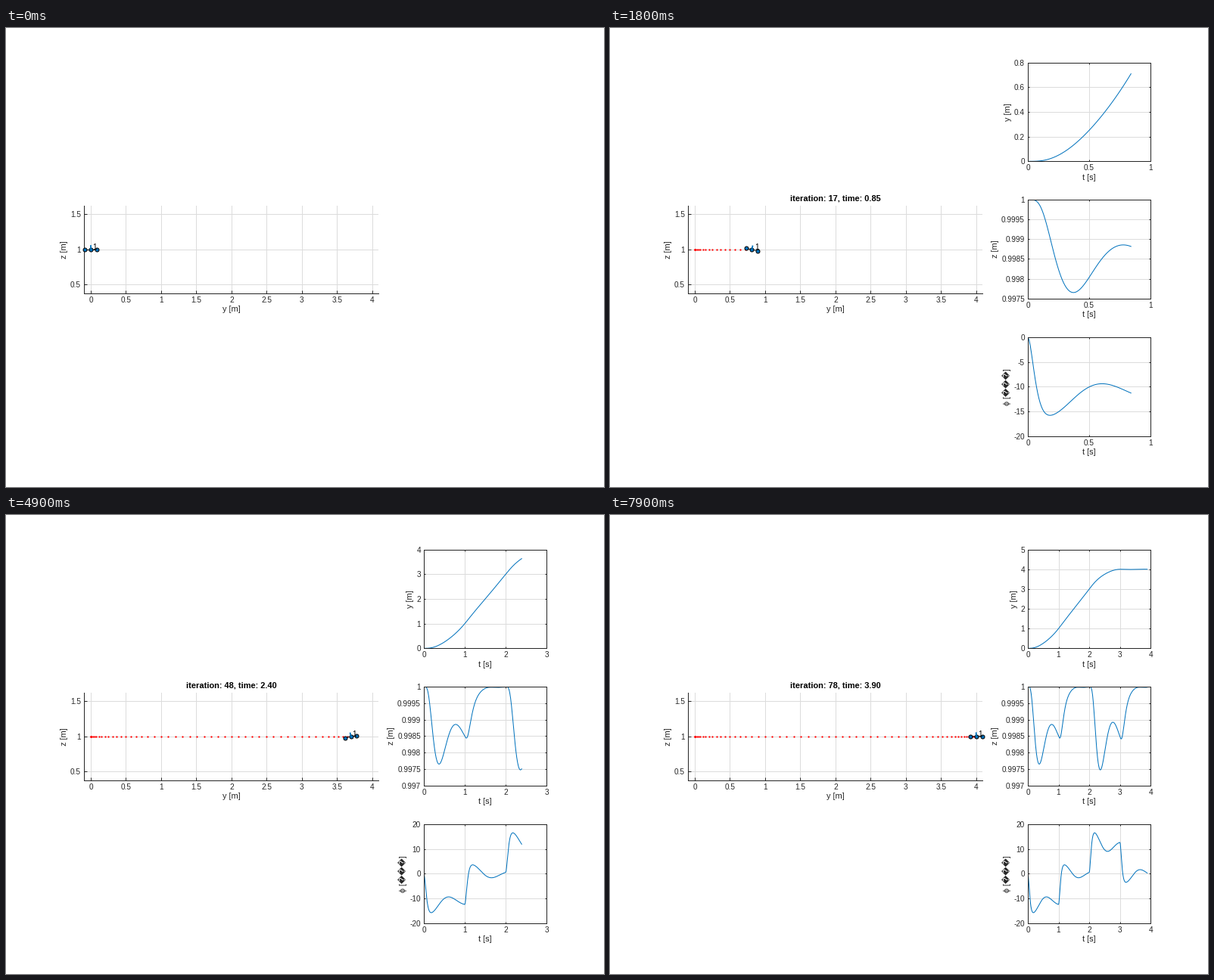
A matplotlib script for the animation above (8 s loop, 790 px wide and 607 px high).

```python
import math

import matplotlib.pyplot as plt
import numpy as np
from matplotlib.animation import FuncAnimation

W, H, DPI = 790, 607, 100
PX = 72 / DPI                      # one pixel in points
DARK, BLUE, GRID = "#262626", "#0072bd", "#dcdcdc"
FRAMES, CTRL_STEPS, DT = 80, 5, 0.01
ARM, MAST, G = 0.086, 0.05, 9.81

plt.rcParams.update({
    "font.family": ["Liberation Sans", "DejaVu Sans"],
    "mathtext.default": "regular",
    "font.size": 10 * PX,
    "axes.linewidth": PX,
    "axes.edgecolor": DARK,
    "axes.axisbelow": True,
    "grid.color": GRID,
    "grid.linewidth": PX,
})


# --- planar quadrotor with a PD controller ---------------------------------

def desired(t):
    """Position, speed and acceleration: speed up, cruise, brake, hover."""
    if t < 1:
        return t * t, 2 * t, 2
    if t < 2:
        return 2 * t - 1, 2, 0
    if t < 3:
        u = 3 - t
        return 4 - u * u, 2 * u, -2
    return 4, 0, 0


def rates(t, s):
    y, z, phi, vy, vz, om = s
    yd, vd, ad = desired(t)
    thrust = G + 130 * (1 - z) - 20 * vz
    phi_cmd = -(ad + 4.8 * (vd - vy) + 39 * (yd - y)) / G
    return np.array([vy, vz, om,
                     -thrust * math.sin(phi),
                     thrust * math.cos(phi) - G,
                     1000 * (phi_cmd - phi) - 50 * om])


def simulate(n, sub=2):
    h = DT / sub
    s = np.array([0, 1, 0, 0, 0, 0], float)
    out = [s]
    for i in range(n * sub):
        t = i * h + 1e-9
        k1 = rates(t, s)
        k2 = rates(t + h / 2, s + h / 2 * k1)
        k3 = rates(t + h / 2, s + h / 2 * k2)
        k4 = rates(t + h - 2e-9, s + h * k3)
        s = s + h / 6 * (k1 + 2 * k2 + 2 * k3 + k4)
        if (i + 1) % sub == 0:
            out.append(s)
    return np.array(out)


states = simulate(FRAMES * CTRL_STEPS)
times = np.arange(len(states)) * DT
series = [states[:, 0], states[:, 1], np.degrees(states[:, 2])]


# --- axes helpers ----------------------------------------------------------

fig = plt.figure(figsize=(W / DPI, H / DPI), dpi=DPI, facecolor="white")


def put_text(x, y, s, **kw):
    return fig.text(x / W, 1 - y / H, s, ha="center", va="center",
                    fontsize=11 * PX, **kw)


def make_axes(left, top, right, bottom, xlabel, ylabel, tick, boxed):
    ax = fig.add_axes([left / W, 1 - bottom / H,
                       (right - left) / W, (bottom - top) / H])
    ax.grid(True)
    ax.tick_params(direction="in", length=tick * PX, width=PX, color=DARK,
                   labelcolor=DARK, pad=4.1 * PX, top=boxed, right=boxed)
    ax.spines[["top", "right"]].set_visible(boxed)
    ax.set_ylabel(ylabel, fontsize=11 * PX, color=DARK, labelpad=3.2 * PX)
    ax.set_xlabel(xlabel, fontsize=11 * PX, color=DARK, va="center")
    ax.xaxis.set_label_coords(0.5, -21.3 / (bottom - top))
    return ax


def nice_ticks(lo, hi, most, slack=0.0):
    """Round steps of 1, 2 or 5 that cover lo..hi in at most `most` parts."""
    power = math.floor(math.log10(max(hi - lo, 1e-9))) - 1
    while True:
        for m in (1, 2, 5):
            step = m * 10.0 ** power
            a = math.floor(lo / step - slack + 1e-6)
            b = math.ceil(hi / step - 1e-6)
            if b - a <= most:
                return np.arange(a, b + 1) * step
        power += 1


def label(v):
    return f"{round(v, 9) + 0.0:.9g}"


def apply_ticks(axis, set_lim, ticks, note=None):
    scale = 1
    top = max(abs(ticks[0]), abs(ticks[-1]))
    power = math.floor(math.log10(top) + 1e-9)
    if note is not None:
        small = power < -2
        note.set_text(rf"$\times10^{{{power}}}$" if small else "")
        scale = 10.0 ** -power if small else 1
    axis.set_ticks(ticks, [label(v * scale) for v in ticks])
    set_lim(ticks[0], ticks[-1])


# --- flight view -----------------------------------------------------------

SCALE, X0, Z1 = 92.9, 112, 292.9       # pixels per metre, pixel of y=0 and z=1
L, T, R, B = 103, 235, 492, 351
view = make_axes(L, T, R, B, "y [m]", "z [m]", 4, False)
view.set_xticks(np.arange(0, 4.1, 0.5), [label(v) for v in np.arange(0, 4.1, 0.5)])
view.set_yticks([0.5, 1, 1.5], ["0.5", "1", "1.5"])
view.set_xlim((L - X0) / SCALE, (R - X0) / SCALE)
view.set_ylim(1 - (B - Z1) / SCALE, 1 + (Z1 - T) / SCALE)
title = put_text((L + R) / 2, 225.9, "", weight="bold", color="black")

trail, = view.plot([], [], "o", color="red", ms=2.3 * PX, mew=0,
                   clip_on=False, zorder=4)
rotor_style = dict(color="black", lw=PX, marker="o", ms=5 * PX, mew=PX,
                   mfc=BLUE, mec="black", clip_on=False, zorder=5)
arm, = view.plot([], [], **rotor_style)
hub, = view.plot([], [], **rotor_style)
mast, = view.plot([], [], color=BLUE, lw=1.8 * PX, clip_on=False, zorder=6)
tag = view.text(0, 1, "1", color="black", va="center", zorder=7)


# --- history plots ---------------------------------------------------------

plots = []
for top, name in ((45.7, "y [m]"), (227.1, "z [m]"),
                  (409, "\u03d5 [\ufffd\ufffd\ufffd]")):
    ax = make_axes(552, top, 714.2, top + 130.6, "t [s]", name, 2, True)
    curve, = ax.plot([], [], color=BLUE, lw=PX)
    note = ax.text(0, 1.03, "", transform=ax.transAxes, color=DARK, va="bottom")
    plots.append((ax, curve, note))


def draw_quad(k):
    path = states[:k * CTRL_STEPS + 1:CTRL_STEPS]
    y, z, phi = path[-1, :3]
    c, s = math.cos(phi), math.sin(phi)
    tip = y - MAST * s, z + MAST * c
    trail.set_data(path[:, 0], path[:, 1])
    arm.set_data([y - ARM * c, y + ARM * c], [z - ARM * s, z + ARM * s])
    hub.set_data([y], [z])
    mast.set_data([y, tip[0]], [z, tip[1]])
    tag.set_position((tip[0] + 2.7 / SCALE, tip[1] - 1.8 / SCALE))


def draw_history(n):
    t = times[:n]
    for i, (ax, curve, note) in enumerate(plots):
        v = series[i][:n]
        curve.set_data(t, v)
        apply_ticks(ax.xaxis, ax.set_xlim, nice_ticks(0, t[-1], 4))
        ticks = nice_ticks(v.min(), v.max(), 6, 0.16 if i == 1 else 0)
        apply_ticks(ax.yaxis, ax.set_ylim, ticks, note)


def update(k):
    draw_quad(k)
    # title and histories lag the pose by one control step
    done = k - 1
    title.set_text("" if k == 0 else
                   f"iteration: {max(done, 1)}, time: {done * 0.05:4.2f}")
    for ax, _, _ in plots:
        ax.set_visible(done >= 1)
    if done >= 1:
        draw_history(done * CTRL_STEPS)
    return []


anim = FuncAnimation(fig, update, frames=FRAMES, init_func=lambda: update(0),
                     interval=100, repeat=True, repeat_delay=0, blit=False)
plt.show()
```
